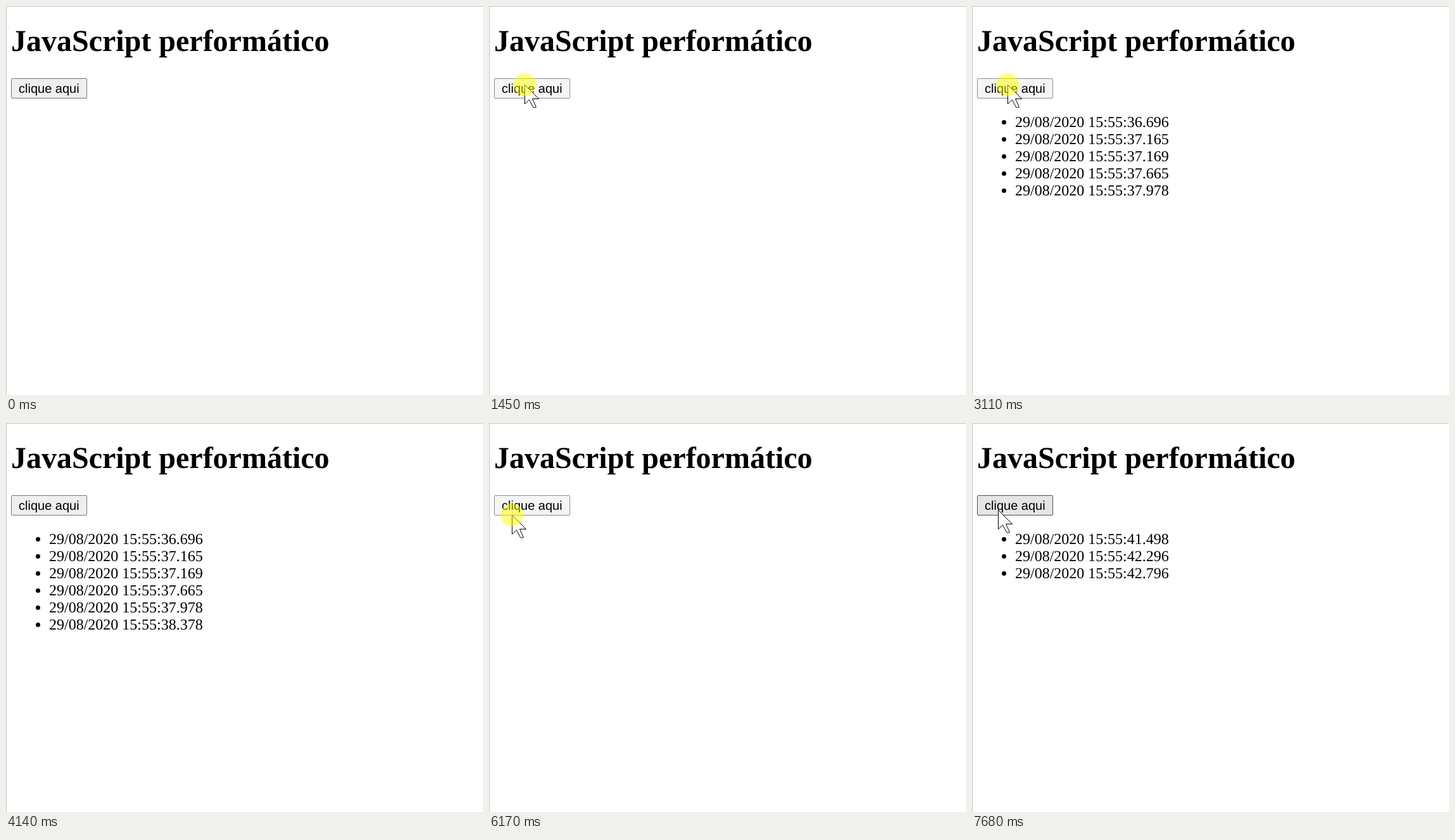
Recreate the animation shown at these times as an HTML page. Size 753 by 614 pixels, loop 8 s.

```html
<!DOCTYPE html>
<html lang="pt-BR">
<head>
<meta charset="utf-8">
<title>JavaScript performático</title>
<style>
  html, body { margin: 0; width: 100%; height: 100%; overflow: hidden; background: #fff; }
  svg { display: block; width: 753px; height: 614px; }
  text { white-space: pre; font-kerning: none; text-rendering: geometricPrecision; }
  .title { font: bold 48px "Liberation Serif", "Times New Roman", serif; }
  .item { font: 24px "Liberation Serif", "Times New Roman", serif; }
  .label { font: 20px "Liberation Sans", Arial, sans-serif; }
  #button { fill: #efefef; stroke: #767676; }
  #button.hover { fill: #e5e5e5; stroke: #4f4f4f; }
  #button.active { fill: #f5f5f5; stroke: #8d8d8d; }
</style>
</head>
<body>
<svg viewBox="0 0 753 614">
  <path d="M0 .5H753M.5 0V614" stroke="#c3c3c3"/>
  <text class="title" x="8" y="71">JavaScript performático</text>
  <rect id="button" x="8.5" y="114.5" width="119" height="31" rx="1.5"/>
  <text class="label" x="20" y="137">clique aqui</text>
  <g id="list"></g>
  <g id="pointer">
    <path d="M.5 .5V30.5L7.5 24 13.5 35.5 15 36.5 18.5 35.5 12.5 22.5H22.5Z" fill="#fff" stroke="#000"/>
    <circle id="halo" r="18" fill="#ff0" fill-opacity=".5"/>
  </g>
</svg>
<script>
const LOOP = 8000;
const RELOAD = 5090;
const STEP = 78;           // pointer sampling interval
const CLOCK_START = 35118; // wall clock at the start of the loop: ms past 15:55

// Each visit of the pointer; a glide is [start, steps, x, y].
const visits = [
  { from: [1255, 1313], end: 4138,
    glides: [[210, 2, 283, 305], [510, 2, 95, 189], [740, 6, 56, 124], [4060, 2, 32, 24]] },
  { from: [-14, 37], end: LOOP,
    glides: [[5300, 6, 33, 155], [5768, 2, 36, 145], [6650, 2, 41, 137]] }
];

// Each click: press time and the wall clock it logs on release.
const clicks = [
  [1360, 36696], [1840, 37165], [1840, 37169], [2410, 37665], [2710, 37978], [3110, 38378],
  [6170, 41498], [6960, 42296], [7510, 42796]
].map(([down, clock]) => ({ down, clock, up: clock - CLOCK_START }));

const $ = id => document.getElementById(id);
const [button, list, pointer, halo] = ["button", "list", "pointer", "halo"].map($);
const show = (node, on) => node.setAttribute("visibility", on ? "inherit" : "hidden");
const easeOut = p => 1 - (1 - p) ** 2;

function pointerAt(t) {
  const visit = visits.find(({ glides, end }) => t >= glides[0][0] && t < end);
  return visit && visit.glides.reduce((pos, [start, steps, ...to]) => {
    if (t < start) return pos;
    const done = Math.min(steps, Math.floor((t - start) / STEP) + 1);
    return pos.map((p, i) => Math.round(p + (to[i] - p) * easeOut(done / steps)));
  }, visit.from);
}

function itemMarkup({ clock }, row) {
  const y = 191 + 27 * row;
  return `<circle cx="50.5" cy="${y - 7.5}" r="3.5"/>` +
    `<text class="item" x="68" y="${y}">29/08/2020 15:55:${(clock / 1000).toFixed(3)}</text>`;
}

let drawnList = "";
function draw(t) {
  const pos = pointerAt(t);
  show(pointer, pos);
  if (pos) pointer.setAttribute("transform", `translate(${pos})`);

  const pressed = clicks.some(({ down, up }) => t >= down && t < up);
  show(halo, pressed);

  const over = pos && pos[0] >= 8 && pos[0] < 128 && pos[1] >= 114 && pos[1] < 146;
  button.setAttribute("class", pressed ? "active" : over ? "hover" : "");

  const since = t < RELOAD ? 0 : RELOAD;
  const markup = clicks.filter(({ up }) => up >= since && up <= t).map(itemMarkup).join("");
  if (markup !== drawnList) list.innerHTML = drawnList = markup;
}

const start = performance.now();
function tick() {
  draw((performance.now() - start) % LOOP);
  requestAnimationFrame(tick);
}
tick();
</script>
</body>
</html>
```
